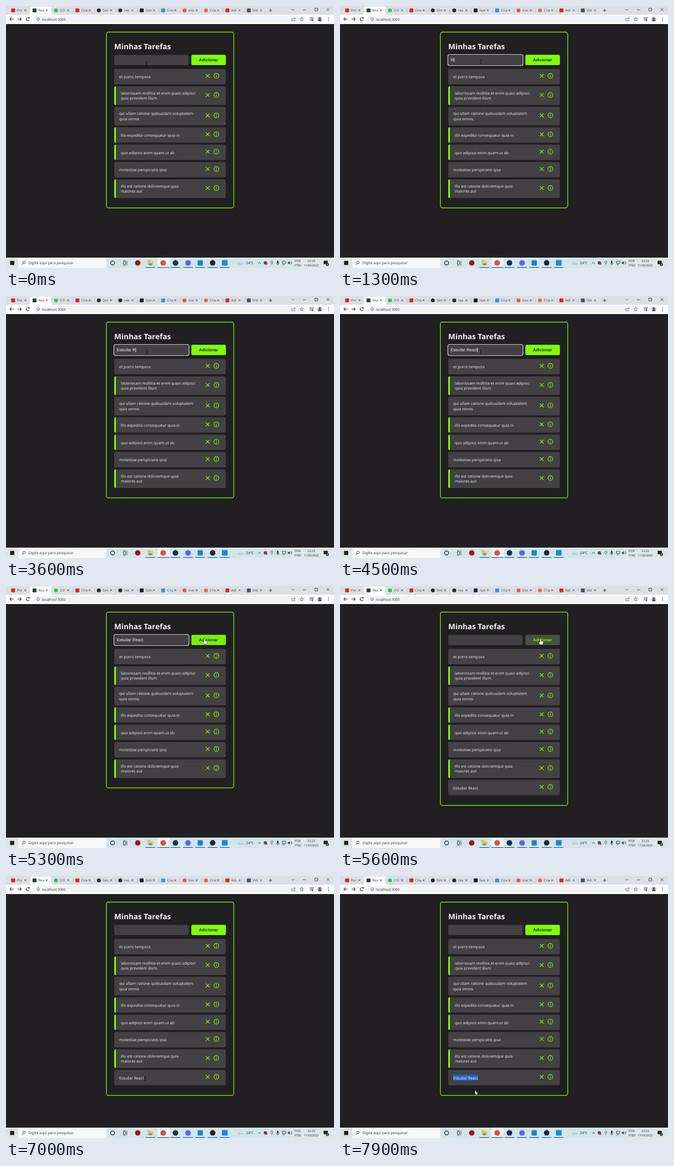
These frames come from a looping animation (600 by 479 pixels, 8000 ms). An HTML page with a canvas:

```html
<!DOCTYPE html>
<html lang="pt">
<head>
<meta charset="utf-8">
<title>Minhas Tarefas</title>
<style>
html, body { margin: 0; width: 100%; height: 100%; overflow: hidden; background: #211f21; }
canvas { display: block; width: 600px; height: 479px; }
</style>
</head>
<body>
<canvas id="stage"></canvas>
<script>
const W = 600, H = 479, LOOP = 8000, STEP = 100;
const GREEN = '#7fff00', PAGE = '#211f21', PANEL = '#434143', INK = '#3c4043';
const UI = '"Open Sans", "Noto Sans", sans-serif';
const ARIAL = '"Liberation Sans", Arial, sans-serif';

const canvas = document.getElementById('stage');
const c = canvas.getContext('2d');
const dpr = window.devicePixelRatio || 1;
canvas.width = W * dpr;
canvas.height = H * dpr;

const clamp = v => Math.max(0, Math.min(1, v));
const ease = p => p * p * (3 - 2 * p);
const mix = (a, b, p) => `rgb(${a.map((v, i) => Math.round(v + (b[i] - v) * p))})`;

function rect(x, y, w, h, fill, r = 0) {
  c.fillStyle = fill;
  c.beginPath();
  c.roundRect(x, y, w, h, r);
  c.fill();
}
function frame(x, y, w, h, color, width, r = 0) {
  c.strokeStyle = color;
  c.lineWidth = width;
  c.beginPath();
  c.roundRect(x, y, w, h, r);
  c.stroke();
}
function dot(x, y, r, fill) {
  c.fillStyle = fill;
  c.beginPath();
  c.arc(x, y, r, 0, 7);
  c.fill();
}
function ring(x, y, r, color, width, from = 0, to = 2 * Math.PI) {
  c.strokeStyle = color;
  c.lineWidth = width;
  c.beginPath();
  c.arc(x, y, r, from, to);
  c.stroke();
}
function line(color, width, ...pts) {
  c.strokeStyle = color;
  c.lineWidth = width;
  c.beginPath();
  for (let i = 0; i < pts.length; i += 2) c.lineTo(pts[i], pts[i + 1]);
  c.stroke();
}
function cross(x, y, r, color, width) {
  line(color, width, x - r, y - r, x + r, y + r);
  line(color, width, x - r, y + r, x + r, y - r);
}
function text(s, x, y, size, color, font = UI, weight = 400, align = 'left') {
  c.font = `${weight} ${size}px ${font}`;
  c.textAlign = align;
  c.fillStyle = color;
  c.fillText(s, x, y);
}

// ---- browser window ----
const tabs = [
  ['Por', '#e62117', 0], ['Rea', '#1d3f40', 0], ['(13', '#2fc351', 1], ['Cria', '#e62117', 0],
  ['Sim', '#24292e', 1], ['rea', '#24292e', 1], ['Sub', '#1b1d2c', 0], ['Cria', '#3c93dc', 0],
  ['trac', '#e2574a', 1], ['Cria', '#dd6a52', 1], ['Adi', '#e62117', 0], ['Vid', '#43536a', 0]
];

function drawBrowser() {
  rect(0, 0, W, 17, '#dcdfe5');
  rect(44, 1, 40, 16, '#fff', [4, 4, 0, 0]);
  tabs.forEach(([label, color, round], i) => {
    const x = 13 + i * 39.2;
    if (round) dot(x, 8, 3.6, color);
    else rect(x - 3.6, 4.6, 7.2, 6.8, color, 1.2);
    text(label, x + 7, 10.4, 6.2, INK);
    cross(x + 22.3, 7.8, 1.8, '#45484c', 0.9);
    if (i > 1) line('#a3a7ad', 0.6, x - 8, 4.5, x - 8, 12);
  });
  line(INK, 1, 481, 8, 487, 8);
  line(INK, 1, 484, 5, 484, 11);
  line(INK, 0.9, 522, 5.5, 524.5, 8, 527, 5.5);
  line(INK, 0.9, 543, 7, 549, 7);
  frame(565, 4, 5, 5, INK, 0.9);
  cross(589, 6.5, 2.6, INK, 0.9);

  rect(0, 16, W, 17, '#fff');
  rect(50, 18, 498, 12.5, '#f1f3f4', 6);
  line(INK, 1.1, 14, 24, 7, 24);
  line(INK, 1.1, 10, 21, 7, 24, 10, 27);
  line(INK, 1.1, 21, 24, 28, 24);
  line(INK, 1.1, 25, 21, 28, 24, 25, 27);
  ring(40, 24, 2.9, INK, 1.1, 0.5, 5.6);
  rect(41, 20.6, 2.4, 2.4, INK);
  ring(59, 24, 2.6, '#5f6368', 0.8);
  line('#5f6368', 0.8, 59, 23.5, 59, 25.6);
  text('localhost:3000', 66, 26.6, 6.4, '#2b2e31');
  line('#5f6368', 0.8, 524, 22.5, 522.8, 22.5, 522.8, 27, 528.5, 27, 528.5, 25);
  line('#5f6368', 0.8, 525, 25, 526, 22.5, 529, 22.5);
  line('#5f6368', 0.8, 527.3, 20.7, 529.2, 22.5, 527.3, 24.3);
  c.beginPath();
  for (let i = 0; i < 10; i++) {
    const a = i * Math.PI / 5 - Math.PI / 2, r = i % 2 ? 1.6 : 3.5;
    c.lineTo(541 + r * Math.cos(a), 24.2 + r * Math.sin(a));
  }
  c.closePath();
  c.stroke();
  for (const y of [21.5, 23.7, 25.9]) line(INK, 0.9, 555.5, y, y > 25 ? 558.5 : 560.5, y);
  line(INK, 0.9, 563, 21, 561.3, 21, 561.3, 26);
  dot(560.3, 26.3, 1.3, INK);
  dot(574, 24, 4.6, '#b4c2dc');
  dot(574, 22.6, 1.7, '#4a3b44');
  rect(571.2, 24.6, 5.6, 3, '#4a3b44', [2.5, 2.5, 1, 1]);
  for (const y of [21.3, 24, 26.7]) dot(590, y, 0.8, INK);
}

// ---- taskbar ----
function drawTaskbar() {
  rect(0, 460, W, 19, '#d4e5e9');
  rect(0, 460, 22, 19, '#dfe4e5');
  rect(520, 460, 80, 19, '#dde6e8');
  rect(7.5, 466, 7.5, 7.5, '#1f1f1f');
  rect(22.5, 460.5, 161, 18.5, '#f7f8f8');
  ring(33, 468.8, 2.3, '#333', 0.9);
  line('#333', 0.9, 31.4, 470.6, 29, 473);
  text('Digite aqui para pesquisar', 41, 472.4, 6.8, '#3a3a3a');

  ring(195, 469.7, 3.6, '#1b1b1b', 1.2);
  frame(214.5, 467.5, 4, 4.5, '#333', 0.8);
  line('#333', 0.8, 214, 465.6, 219, 465.6);
  line('#333', 0.8, 214, 474, 219, 474);
  line('#333', 0.9, 221, 465.5, 221, 474);
  dot(241, 469.7, 5, '#a3161c');
  rect(259, 465, 5, 3, '#d99a22', 0.8);
  rect(259, 466.2, 10.4, 7.6, '#f6c646', 0.8);
  rect(261.5, 470.6, 5.4, 3.2, '#3f8fd2');
  rect(277, 460, 22, 19, '#eef5f6');
  dot(287.5, 469.6, 5.2, '#dd5144');
  dot(310, 469.6, 5.2, '#17324f');
  dot(333, 469.6, 5.2, '#5865f2');
  rect(350.5, 464.8, 9.6, 9.6, '#2080cc', 1.5);
  dot(378, 469.6, 5, '#252428');
  rect(395, 464.6, 10.4, 10, '#1c86d8', 1);
  [264, 288, 310, 333, 355, 378, 400].forEach((x, i) =>
    rect(x - (i === 1 ? 11 : 9), 477.6, i === 1 ? 22 : 18, 1.4, '#0f78d0'));

  dot(427, 470.5, 2.8, '#b9d5ea');
  dot(430.5, 469, 3.3, '#c6dff0');
  rect(424.5, 470, 10.5, 3.3, '#b4d0e6', 1.6);
  text('24°C', 439, 472.3, 6.4, '#222');
  line('#222', 0.9, 461, 471, 463.5, 468.5, 466, 471);
  dot(474.5, 469.5, 3.1, '#59494d');
  dot(476.4, 471.4, 1.8, '#d83232');
  frame(484.5, 466.3, 3.4, 4, '#444', 0.8, 1);
  line('#444', 0.8, 486.2, 470.5, 486.2, 473.4);
  rect(495.8, 465.5, 2.6, 5, '#222', 1.3);
  ring(497.1, 469.5, 2.6, '#222', 0.7, 0, Math.PI);
  line('#222', 0.7, 497.1, 472, 497.1, 474);
  frame(505.5, 466.5, 6, 4.4, '#333', 0.8);
  line('#333', 0.8, 506, 473, 510, 473);
  c.fillStyle = '#333';
  c.beginPath();
  for (const [x, y] of [[515.5, 468.4], [517, 468.4], [519, 466.5], [519, 472.7], [517, 470.8], [515.5, 470.8]]) c.lineTo(x, y);
  c.fill();
  ring(519.2, 469.6, 1.9, '#333', 0.7, -0.9, 0.9);
  ring(519.2, 469.6, 3.8, '#333', 0.7, -0.9, 0.9);
  text('POR', 528, 467.6, 5.4, '#222');
  text('PTB2', 528, 475.8, 5.2, '#222');
  text('22:23', 558.5, 467.6, 5.4, '#222', UI, 400, 'center');
  text('11/02/2022', 558.5, 475.8, 5.1, '#222', UI, 400, 'center');
  rect(581, 465.8, 7.6, 6.2, '#222', 0.6);
  dot(588, 472.6, 2.8, '#3b3b3b');
  text('3', 588, 474.3, 4.4, '#fff', UI, 400, 'center');
}

// ---- task list ----
const TASK = 'Estudar React', ADDED = 5600;
const tasks = [
  [115, 0, 'et porro tempora'],
  [147, 1, 'laboriosam mollitia et enim quasi adipisci', 'quia provident illum'],
  [184.3, 0, 'qui ullam ratione quibusdam voluptatem', 'quia omnis'],
  [221.8, 1, 'illo expedita consequatur quia in'],
  [253.4, 1, 'quo adipisci enim quam ut ab'],
  [285.2, 0, 'molestiae perspiciatis ipsa'],
  [317, 1, 'illo est ratione doloremque quia', 'maiores aut'],
  [354.5, 0, TASK]
];

function drawTask([y, done, ...lines], selectFrom) {
  const h = lines.length > 1 ? 34 : 28, mid = y + h / 2, x = done ? 210 : 207;
  rect(198, y, 204, h, PANEL, 2.5);
  if (done) rect(198, y, 3, h, GREEN, [2.5, 0, 0, 2.5]);
  if (selectFrom !== undefined) rect(selectFrom, mid - 4.7, 252.3 - selectFrom, 10, '#2469d2');
  const base = lines.length > 1 ? mid - 2.4 : mid + 3.1;
  lines.forEach((s, i) => text(s, x, base + i * 9.8, 7.1, '#f2f2f2'));
  const iy = mid - 1.2;
  cross(369, iy, 3.4, GREEN, 1.2);
  ring(384.8, iy, 4.4, GREEN, 1.1);
  line(GREEN, 1.1, 384.8, iy - 0.5, 384.8, iy + 2.4);
  rect(384.2, iy - 2.4, 1.2, 1.2, GREEN);
}

// [time, characters typed of the task]
const keyTimes = [2100, 2300, 2450, 2600, 2750, 2900, 3050, 3250, 3500, 3700, 3950, 4150, 4400];

function typed(t) {
  if (t >= ADDED) return ['', 0];
  if (t < 1200) return ['', 1000];
  if (t < 1700) return ['R', 1200];
  const n = keyTimes.filter(k => k <= t).length;
  return [TASK.slice(0, n), n ? keyTimes[n - 1] : 1700];
}

function drawForm(t) {
  rect(198, 89.5, 136, 18.5, PANEL, 2.5);
  const [value, lastKey] = typed(t);
  text(value, 202.5, 101.2, 7.7, '#f4f4f4', ARIAL);
  if (t >= 1000 && t < 5500) {
    frame(198.3, 89.7, 135.4, 18.1, '#161516', 0.8, 2.5);
    frame(197.4, 88.8, 137.2, 19.9, '#f4f4f4', 1.1, 3);
    if ((t - lastKey) % 1000 < 500) {
      const x = 203 + c.measureText(value).width;
      line('#f4f4f4', 0.8, x, 94.3, x, 102.8);
    }
  }
  const hover = clamp((t - 5270) / 360) * (1 - clamp((t - 5870) / 370));
  const on = [127, 255, 0], off = [67, 65, 67], dark = [33, 31, 33];
  rect(339, 89.3, 63.3, 18.7, mix(on, off, hover), 2.5);
  text('Adicionar', 370.5, 101.3, 7.6, mix(dark, on, hover), ARIAL, 700, 'center');
}

// ---- pointer ----
const path = [
  [0, 257, 106], [800, 258, 102], [4700, 258, 102], [5250, 363, 96], [5600, 367, 97], [5800, 367, 97],
  [6150, 237, 427], [6500, 237, 427], [7050, 255, 369], [7150, 255, 369], [7500, 204, 369], [7600, 204, 369],
  [7900, 247, 392], [LOOP, 247, 392]
];

function pointerAt(t) {
  const i = path.findIndex(p => p[0] > t), [t0, x0, y0] = path[i - 1], [t1, x1, y1] = path[i];
  const p = ease((t - t0) / (t1 - t0));
  return [x0 + (x1 - x0) * p, y0 + (y1 - y0) * p];
}

function outline(d, x, y) {
  c.save();
  c.translate(x, y);
  const shape = new Path2D(d);
  c.strokeStyle = '#111';
  c.lineWidth = 1;
  c.stroke(shape);
  c.fillStyle = '#fff';
  c.fill(shape);
  c.restore();
}

function drawPointer(t, x, y) {
  const within = (l, top, r, b) => x >= l && x <= r && y >= top && y <= b;
  if (within(198, 89, 334, 108) || (t > 6900 && within(203, 363, 256, 374))) {
    line('#0c0c0c', 0.9, x, y - 3.5, x, y + 3.5);
    line('#0c0c0c', 0.8, x - 1.5, y - 3.6, x + 1.5, y - 3.6);
    line('#0c0c0c', 0.8, x - 1.5, y + 3.6, x + 1.5, y + 3.6);
  } else if (within(339, 89, 402, 108)) {
    outline('M-1 1Q0-.8 1 1V4L4 4.6Q5 5 4.6 7L3.8 10H-.8L-3.4 6.4Q-3.4 5-1 6.2Z', x, y);
  } else {
    outline('M0 0V7.6L1.8 6L3 8.8L4.2 8.3L3 5.6H5.4Z', x, y);
  }
}

function draw(t) {
  c.setTransform(dpr, 0, 0, dpr, 0, 0);
  c.textRendering = 'geometricPrecision';
  rect(0, 0, W, H, PAGE);
  const added = t >= ADDED;
  frame(183.6, 47.6, 233, added ? 353.6 : 321.6, GREEN, 1.2, 4);
  text('Minhas Tarefas', 198, 78.6, 13.75, '#f5f5f5', UI, 700);
  drawForm(t);
  const [x, y] = pointerAt(t);
  const from = t <= 7150 ? undefined : t < 7500 ? Math.max(207, Math.min(252, x)) : 207;
  tasks.forEach((task, i) => {
    if (i < 7) drawTask(task);
    else if (added) drawTask(task, from);
  });
  drawBrowser();
  drawTaskbar();
  drawPointer(t, x, y);
}

function tick(now) {
  draw(Math.floor((now % LOOP) / STEP) * STEP);
  requestAnimationFrame(tick);
}
draw(0);
requestAnimationFrame(tick);
</script>
</body>
</html>
```
